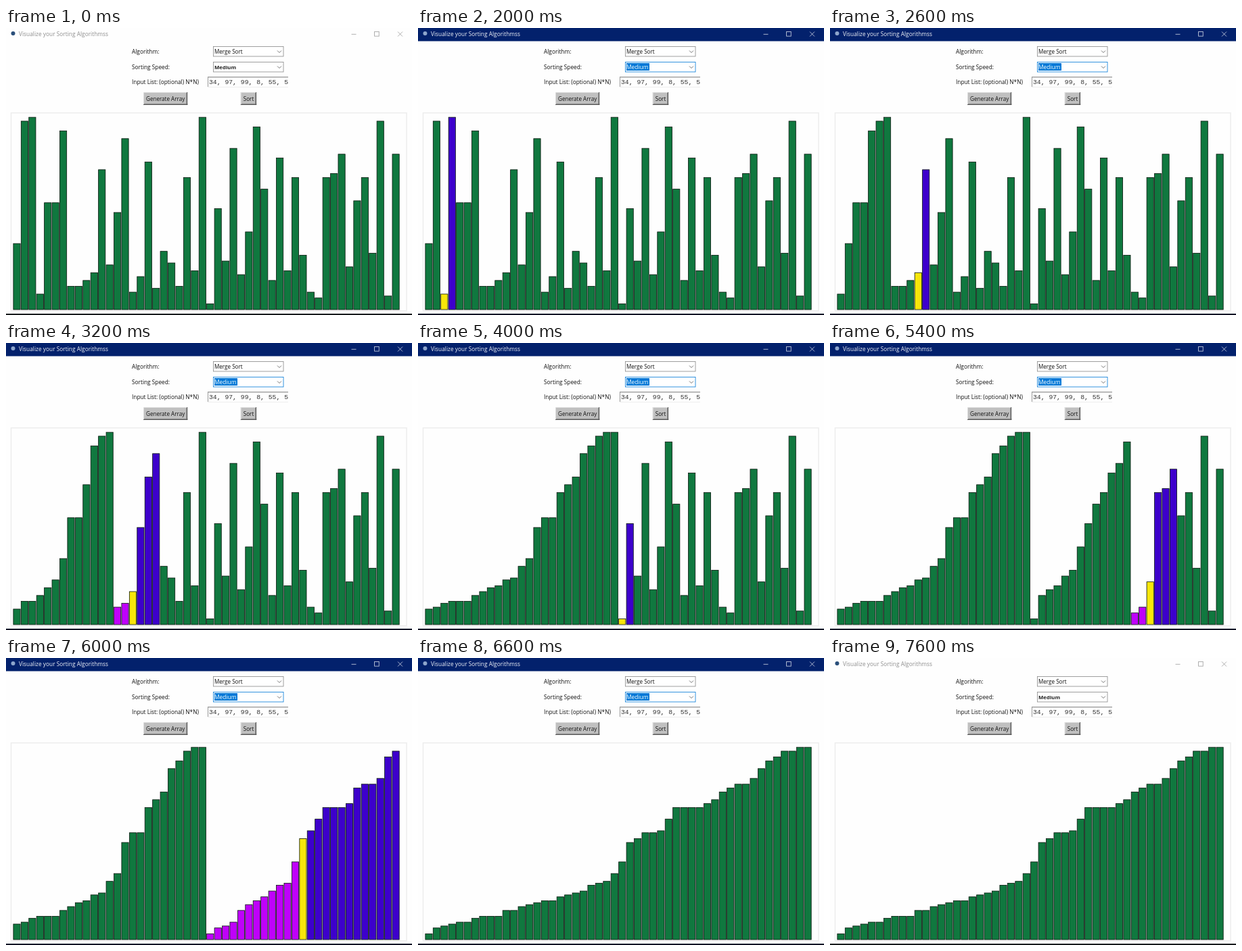
Write an HTML page with a canvas that moves like this. It is 600 px wide and 425 px high and loops after 7800 ms.

```html
<!DOCTYPE html>
<html lang="en">
<head>
<meta charset="utf-8">
<title>Sorting visualizer</title>
<style>
  html, body { margin: 0; width: 100%; height: 100%; overflow: hidden; background: #fefefe; }
  canvas { display: block; width: 600px; height: 425px; }
</style>
</head>
<body>
<canvas id="stage" width="600" height="425"></canvas>
<script>
const ctx = document.getElementById('stage').getContext('2d');

const LOOP = 7800, TICK = 200;
const ACTIVE_FROM = 1800, ACTIVE_TO = 7000;
const UI = '"Open Sans", "Noto Sans", sans-serif';
const MONO = '"Liberation Mono", "Courier New", monospace';
const GREEN = '#10783f', PURPLE = '#bf01fb', YELLOW = '#f7e60a', BLUE = '#3d00cc';
const BASE = 417, UNIT = 2.877;
const BAR_LEFT = 10.9, BAR_STEP = 11.43, BAR_WIDTH = 10.2;

const values = [
  34, 97, 99, 8, 55, 55, 92, 12, 12, 15, 19, 72, 23, 50, 88, 9, 17, 76, 11, 30,
  24, 12, 68, 20, 99, 3, 52, 25, 83, 18, 40, 94, 62, 15, 78, 20, 68, 28, 9, 6,
  68, 70, 80, 22, 56, 68, 29, 97, 7, 80
];

// [time, merges done]; the pace drifts slightly while sorting
const pace = [[1840, 0], [2000, 2], [3200, 17], [4000, 25], [5400, 41], [6000, 48], [6200, 50]];

// One state after every merge, then the finished list in plain green
function record(list) {
  const data = list.slice();
  const states = [{ data: list, start: -1, mid: -1, end: -1 }];
  (function sort(start, end) {
    if (start >= end) return;
    const mid = (start + end) >> 1;
    sort(start, mid);
    sort(mid + 1, end);
    const merged = data.slice(start, end + 1).sort((a, b) => a - b);
    data.splice(start, merged.length, ...merged);
    states.push({ data: data.slice(), start, mid, end });
  })(0, data.length - 1);
  states.push({ data, start: -1, mid: -1, end: -1 });
  return states;
}

const states = record(values);

function mergesAt(t) {
  if (t <= pace[0][0]) return 0;
  for (let i = 1; i < pace.length; i++) {
    const [t0, n0] = pace[i - 1], [t1, n1] = pace[i];
    if (t <= t1) return Math.floor(n0 + (n1 - n0) * (t - t0) / (t1 - t0) + 1e-6);
  }
  return states.length - 1;
}

function rect(x, y, w, h, color) {
  ctx.fillStyle = color;
  ctx.fillRect(x, y, w, h);
}

// x, y, w, h follow the middle of the stroke
function outline(x, y, w, h, color, width = 0.8) {
  ctx.strokeStyle = color;
  ctx.lineWidth = width;
  ctx.strokeRect(x, y, w, h);
}

function line(points, color) {
  ctx.strokeStyle = color;
  ctx.lineWidth = 0.8;
  ctx.beginPath();
  points.forEach(([x, y]) => ctx.lineTo(x, y));
  ctx.stroke();
}

function text(str, x, y, color = '#111', font = '8.3px ' + UI, align = 'left') {
  ctx.font = font;
  ctx.textAlign = align;
  ctx.fillStyle = color;
  ctx.fillText(str, x, y);
}

function titleBar(active) {
  const ink = active ? '#d5dbe8' : '#9c9c9c';
  if (active) rect(0, 0, 600, 19.5, '#03216c');
  ctx.fillStyle = active ? '#8ea6cc' : '#2a4f7a';
  ctx.beginPath();
  ctx.arc(10.5, 8, 3, 0, Math.PI * 2);
  ctx.fill();
  text('Visualize your Sorting Algorithmss', 19, 12, active ? '#f0f2f8' : '#8f8f8f', '8.35px ' + UI);
  line([[510.5, 9.3], [517.5, 9.3]], ink);
  outline(544.6, 5.5, 6.6, 6.6, ink);
  line([[579, 5.5], [586, 12.5]], ink);
  line([[586, 5.5], [579, 12.5]], ink);
}

function combo(y, border) {
  rect(306, y, 104, 15, '#fff');
  outline(306.4, y + 0.4, 103.6, 14.6, border);
  line([[401, y + 6.5], [404, y + 9.5], [407, y + 6.5]], '#555');
}

function button(label, x, w) {
  rect(x, 95, w, 19, '#c0c0c0');
  rect(x, 95, w, 0.8, '#e6e6e6');
  rect(x, 95, 0.8, 19, '#e6e6e6');
  rect(x + 1, 112, w - 1, 1, '#858585');
  rect(x + w - 2, 96, 1, 17, '#858585');
  rect(x, 113, w, 0.8, '#444');
  rect(x + w - 1, 95, 0.8, 19, '#444');
  text(label, x + w / 2, 107.5, '#111', '8.1px ' + UI, 'center');
}

function controls(active) {
  text('Algorithm:', 186, 38);
  text('Sorting Speed:', 186, 60.5);
  text('Input List: (optional) N*N)', 186, 83);

  combo(27, '#888');
  text('Merge Sort', 308, 38, '#111', '8.1px ' + UI);
  combo(50, active ? '#0078d7' : '#888');
  if (active) rect(308, 52, 34, 11, '#0078d7');
  text('Medium', 308, 60.5, active ? '#fff' : '#222',
    active ? '8.4px ' + UI : 'bold 7.8px ' + UI);

  rect(298, 72, 119, 1, '#999');
  rect(298, 72, 1, 15, '#999');
  rect(299, 73, 118, 1, '#ddd');
  rect(298, 87, 119, 1, '#eee');
  ctx.save();
  ctx.beginPath();
  ctx.rect(298, 72, 119, 16);
  ctx.clip();
  text('34, 97, 99, 8, 55, 5', 300, 83, '#333', '9.75px ' + MONO);
  ctx.restore();

  button('Generate Array', 203, 65.3);
  button('Sort', 346.8, 23.4);
}

function barColor(i, { start, mid, end }) {
  if (i < start || i > end) return GREEN;
  return i < mid ? PURPLE : i === mid ? YELLOW : BLUE;
}

function bars(state) {
  outline(7.5, 125.7, 584.5, 293, '#ececec', 1.4);
  state.data.forEach((v, i) => {
    const x = BAR_LEFT + BAR_STEP * i;
    const h = UNIT * v;
    rect(x, BASE - h, BAR_WIDTH, h, barColor(i, state));
    outline(x, BASE - h, BAR_WIDTH, h, '#08140c');
  });
}

function draw(t) {
  const active = t >= ACTIVE_FROM && t < ACTIVE_TO;
  rect(0, 0, 600, 425, '#fefefe');
  titleBar(active);
  controls(active);
  bars(states[mergesAt(t)]);
  rect(0, 423, 600, 2, active ? '#0c1626' : '#191c1e');
}

function tick() {
  const t = performance.now() % LOOP;
  draw(Math.floor(t / TICK) * TICK);
  requestAnimationFrame(tick);
}
tick();
</script>
</body>
</html>
```
